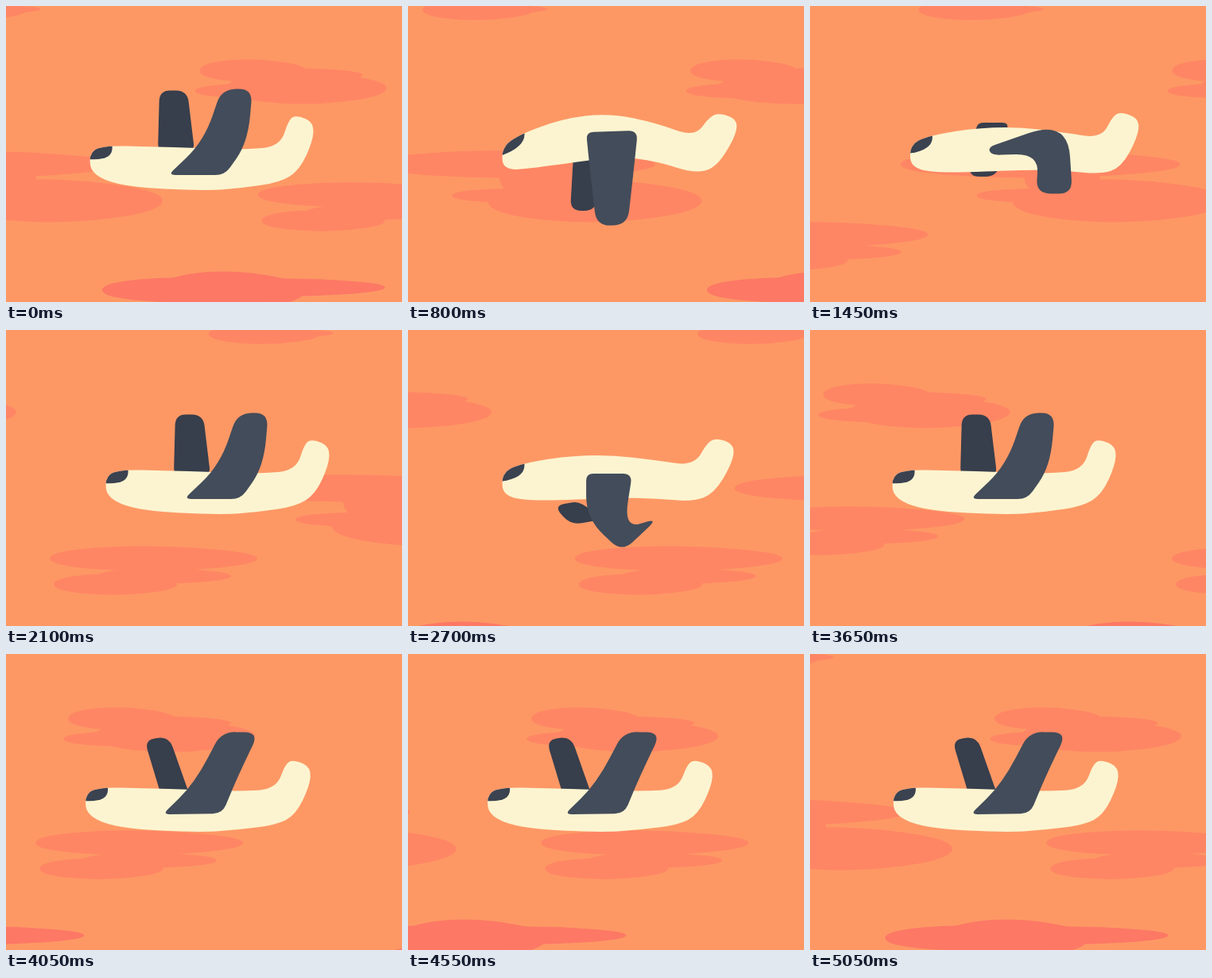
Animation of 498 by 373 pixels, one loop 5100 ms. Source, as an HTML page with a canvas:

```html
<!DOCTYPE html>
<html lang="en">
<head>
<meta charset="utf-8">
<title>Flying dog</title>
<style>
html, body { margin: 0; width: 100%; height: 100%; overflow: hidden; background: #fd9865; }
canvas { display: block; }
</style>
</head>
<body>
<canvas id="stage" width="498" height="373"></canvas>
<script>
const ctx = document.getElementById('stage').getContext('2d');
const LOOP = 5100, SKY = 5050, FLAP = 505;
const SOFT = 999;

const mod = (a, n) => ((a % n) + n) % n;
const lerp = (a, b, u) => a + (b - a) * u;
const mix = (p, q, u) => p.map((v, i) => Array.isArray(v) ? mix(v, q[i], u) : lerp(v, q[i], u));
const smooth = (a, b, x) => {
  const u = Math.max(0, Math.min(1, (x - a) / (b - a)));
  return u * u * (3 - 2 * u);
};

// Polygon with rounded corners; a SOFT radius rounds up to the middle of each side
function trace(pts, radius) {
  const n = pts.length;
  const toward = (p, q, r) => {
    const d = Math.hypot(q[0] - p[0], q[1] - p[1]) || 1;
    return mix(p, q, Math.min(.5, r / d));
  };
  ctx.beginPath();
  pts.forEach((p, i) => {
    const r = radius ? radius[i] : SOFT;
    ctx.lineTo(...toward(p, pts[(i + n - 1) % n], r));
    ctx.quadraticCurveTo(...p, ...toward(p, pts[(i + 1) % n], r));
  });
  ctx.closePath();
}

function blob(pts, fill, radius) {
  trace(pts, radius);
  ctx.fillStyle = fill;
  ctx.fill();
}

// A cloud is a stack of flat lobes: left, right, top, bottom
const LOBE = [[0, .2], [.45, -.06], [1, .25], [1, .75], [.5, 1.06], [0, .8]];
const band = [[0, 140, -8, 18], [70, 157, -1, 9]];
const streak = [[6, 140, 67, 96], [60, 211, 78, 96], [0, 180, 97, 117], [40, 241, 83, 124]];
const wide = [[-96, 256, 182, 217], [60, 155, 195, 240], [0, 160, 230, 248], [45, 314, 218, 273]];
const puff = [[0, 261, 222, 254], [60, 228, 250, 270], [5, 160, 257, 284]];
const low = [[0, 220, 342, 374], [70, 255, 334, 384], [120, 356, 343, 366]];

// x at clock 0, speed in px/ms, clock at which the pass begins
const cloud = (lobes, x, v, from, y = 0, fill = '#ff8664') => ({ lobes, x, v, from, y, fill });
const clouds = [
  cloud(band, -127.5, .182, 0),
  cloud(streak, 226, .154, -3200),
  cloud(wide, -135, .2375, -900),
  cloud(puff, 297, .26, -2600),
  cloud(puff, -487, .258, 0, 50),
  cloud(low, 94, .352, -1500, 0, '#fd7865'),
  cloud(low, -1036, .352, 0, 33, '#fd7865')
];

function drawClouds(clock) {
  for (const c of clouds) {
    const x = c.x + c.v * (mod(clock - c.from, SKY) + c.from);
    for (const [l, r, t, b] of c.lobes) {
      blob(LOBE.map(([u, v]) => [x + lerp(l, r, u), c.y + lerp(t, b, v)]), c.fill);
    }
  }
}

// Resting dog; each pose bends it
const BODY = [[104, 188], [118, 176], [180, 177], [240, 179], [300, 181], [345, 177], [356, 141],
  [368, 138], [387, 147], [386, 170], [369, 207], [345, 222], [300, 229], [250, 233], [150, 228],
  [108, 213]];
const NOSE = [[103, 193], [138, 196], [133, 174], [95, 166]];
const NEAR_R = [9, SOFT, 18, 18, SOFT, 12];
const FAR_R = [8, 14, 14, 8];

// bend: lift, arch, tail lean. Wings run from the front root round the tip to the back root.
const poses = [
  { at: 5, dx: -5.5, bend: [-8, 0, 2],
    near: [[197, 202], [237, 163], [271, 98], [318, 99], [292, 153], [272, 201]],
    far: [[195, 178], [174, 108], [205, 104], [231, 178]] },
  { at: 78, dx: 0, bend: [0, 0, 0],
    near: [[204, 213], [249, 170], [271, 105], [310, 104], [304, 172], [275, 213]],
    far: [[191, 182], [193, 106], [228, 107], [237, 182]] },
  { at: 220, dx: 3.8, bend: [-2, 20, 11],
    near: [[215, 181], [215, 238], [260, 280], [306, 237], [262, 251], [273, 181]],
    far: [[204, 216], [174, 222], [196, 246], [240, 238]] },
  { at: 295, dx: 12.9, bend: [-4, 40, 15],
    near: [[224, 159], [230, 218], [237, 277], [276, 276], [283, 215], [289, 157]],
    far: [[208, 188], [204, 258], [236, 258], [240, 188]] },
  { at: 440, dx: 20.3, bend: [-7, 20, 7],
    near: [[224, 178], [324, 143], [330, 237], [284, 236], [288, 186], [228, 188]],
    far: [[210, 147], [199, 215], [235, 215], [250, 147]] }
];

function bendBody(pts, [lift, arch, lean]) {
  return pts.map(([x, y]) => {
    const hump = Math.sin(Math.PI * Math.max(0, Math.min(1, (x - 105) / 265)));
    const tail = smooth(330, 370, x);
    return [x + lean * tail * (230 - y) / 80, y + lerp(lift - arch * hump, lift / 2, tail)];
  });
}

function drawDog(t, clock) {
  const first = poses[0].at;
  const phase = mod(clock - first, FLAP) + first;
  const i = poses.filter(p => p.at <= phase).length - 1;
  const a = poses[i], b = poses[(i + 1) % poses.length];
  // poses are held and change quickly
  const u = smooth(.3, .7, (phase - a.at) / mod(b.at - a.at, FLAP));
  const wing = part => mix(a[part], b[part], u).map(([x, y]) => [x - lerp(a.dx, b.dx, u), y]);
  const bend = mix(a.bend, b.bend, u);
  const body = bendBody(BODY, bend);
  const [left, tip, top, out] = bendBody(NOSE, bend);

  ctx.save();
  ctx.translate(7.56 + 13.68 * Math.cos(2 * Math.PI * (t - 1750) / LOOP), 0);
  blob(wing('far'), '#373e4c', FAR_R);
  blob(body, '#fcf4d0');

  ctx.save();
  trace(body);
  ctx.clip();
  ctx.beginPath();
  ctx.moveTo(...left);
  ctx.quadraticCurveTo(...tip, ...top);
  ctx.lineTo(...out);
  ctx.fillStyle = '#3b4250';
  ctx.fill();
  ctx.restore();

  blob(wing('near'), '#434c5a', NEAR_R);
  ctx.restore();
}

function draw(now) {
  const t = mod(now, LOOP);
  const clock = t + 75 * Math.max(0, 1 - t / 600);
  ctx.fillStyle = '#fd9865';
  ctx.fillRect(0, 0, 498, 373);
  drawClouds(clock);
  drawDog(t, clock);
}

const start = performance.now();
function tick() {
  draw(performance.now() - start);
  requestAnimationFrame(tick);
}
tick();
</script>
</body>
</html>
```
